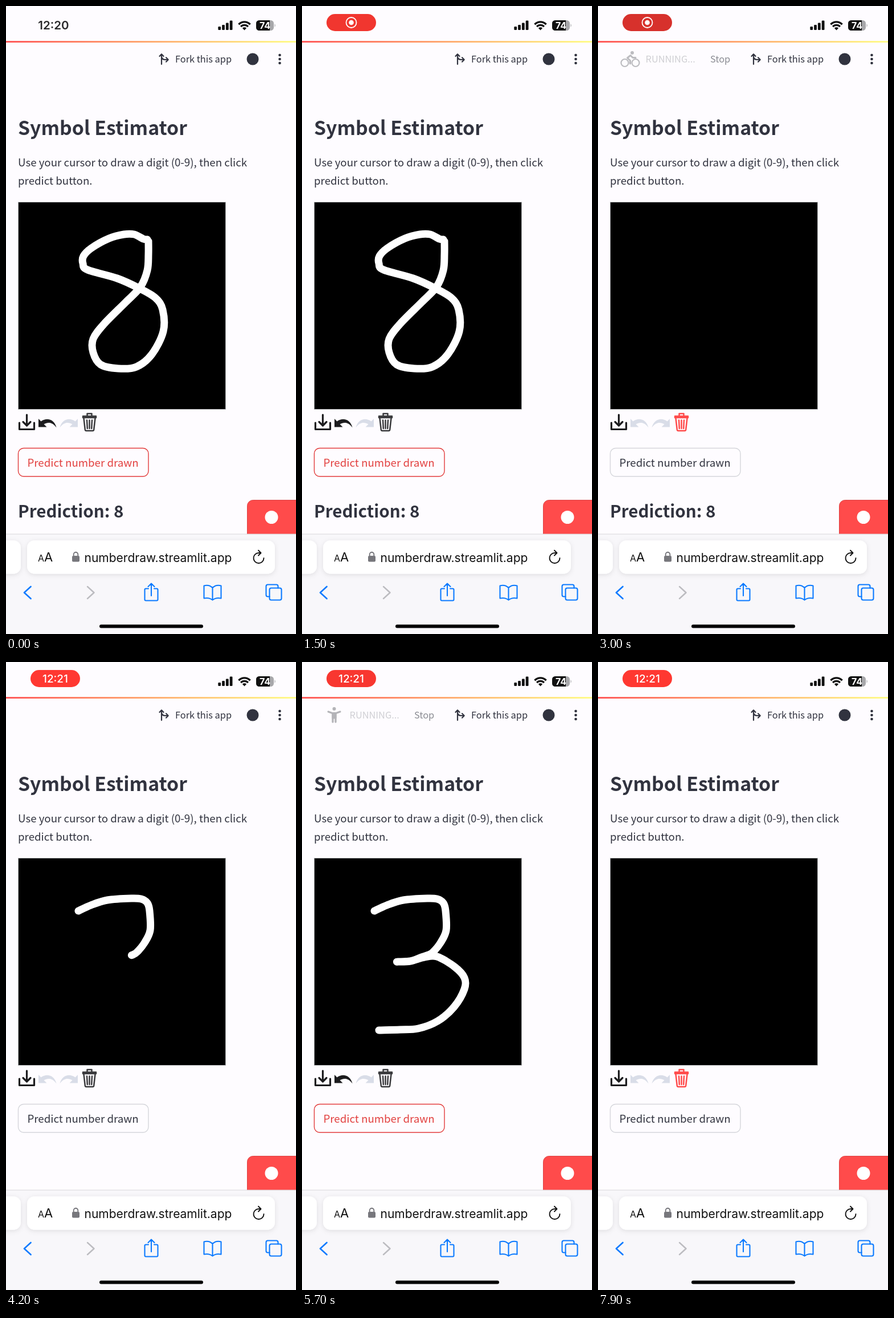
Write an HTML page that moves like this. It is 509 px wide and 1100 px high and loops after 8 s.

```html
<!DOCTYPE html>
<html lang="en">
<head>
<meta charset="utf-8">
<title>Digit drawing demo</title>
<style>
  html, body { margin: 0; width: 100%; height: 100%; overflow: hidden; background: #fefcff; }
  svg { display: block; width: 509px; height: 1100px; }
  text { fill: #31333f; font-family: "Noto Sans CJK JP", "Noto Sans CJK SC", "Noto Sans CJK", "Noto Sans", sans-serif; font-size: 18.7px; white-space: pre; }
  .small { font-size: 16.35px; }
  .bold { font-weight: 700; }
  .ios { font-family: Inter, Roboto, sans-serif; fill: #111; }
  .line { fill: none; stroke-linecap: round; stroke-linejoin: round; }
  .blue { stroke: #0a7aff; stroke-width: 2.1; }
  .ink { stroke: #fff; stroke-width: 13; }
</style>
</head>
<body>
<svg viewBox="0 0 509 1100">
  <defs>
    <linearGradient id="bar"><stop stop-color="#ff4b4b"/><stop offset="1" stop-color="#fffd80"/></linearGradient>
    <filter id="shade" x="-10%" y="-20%" width="120%" height="150%">
      <feDropShadow dx="0" dy="2" stdDeviation="4" flood-color="#000" flood-opacity=".1"/>
    </filter>
    <path id="turn" d="M57 723 V737.5 H71.5 L66.5 732.5 C74 728 82 729 88.5 738.5 C85 724 72 720 61.5 727.5 Z"/>
  </defs>
  <rect width="509" height="1100" fill="#fefcff"/>

  <!-- status bar -->
  <text id="clock" class="ios" x="83.5" y="41.3" text-anchor="middle" font-weight="600" style="font-size:20.5px;fill:#29292b">12:20</text>
  <g id="pill">
    <rect id="pillBox" x="43" y="14" width="87" height="30" rx="15"/>
    <g id="rec" fill="none" stroke="#fff" stroke-width="1.8">
      <circle cx="86.5" cy="29" r="9"/><circle cx="86.5" cy="29" r="4.3" fill="#fff" stroke="none"/>
    </g>
    <text id="pillTime" class="ios" x="86.5" y="36" text-anchor="middle" font-weight="500" style="font-size:19px;fill:#fff">12:21</text>
  </g>
  <g id="signal" fill="#111"></g>
  <g class="line" stroke="#111" stroke-width="3.4" style="stroke-linecap:butt">
    <path d="M408.4 32.2 A14 14 0 0 1 428.6 32.2"/>
    <path d="M412.1 36.2 A8.6 8.6 0 0 1 424.9 36.2"/>
    <path d="M418.5 42.5 l-3.6 -3.8 a5.2 5.2 0 0 1 7.2 0 z" fill="#111" stroke="none"/>
  </g>
  <rect x="439" y="25" width="31" height="18" rx="5.5" fill="#a8a8ab"/>
  <path d="M463 25 h-18.5 a5.5 5.5 0 0 0 -5.5 5.5 v7 a5.5 5.5 0 0 0 5.5 5.5 h18.5 z" fill="#111"/>
  <path d="M471.5 31 q2.5 3 0 6 z" fill="#a8a8ab"/>
  <text class="ios" x="454.5" y="40" text-anchor="middle" font-weight="700" style="font-size:16px;fill:#fff">74</text>

  <!-- app header -->
  <rect y="61.3" width="509" height="2.7" fill="url(#bar)"/>
  <g id="running">
    <g id="bike" class="line" stroke="#bcbcc0" stroke-width="2.2">
      <circle cx="47" cy="99.5" r="6.5"/><circle cx="66" cy="99.5" r="6.5"/>
      <circle cx="60" cy="82" r="3" fill="#bcbcc0" stroke="none"/>
      <path d="M56.5 101 V95.5 L51.5 91 L57 86.5 L61 90.5 H66" stroke-width="3"/>
    </g>
    <g id="man" class="line" stroke="#b4b4b8" stroke-width="3">
      <circle cx="56.5" cy="82" r="3" fill="#b4b4b8" stroke="none"/>
      <path d="M46 87 L53 89.5 H60 L67 87"/>
      <path d="M54 90 V105 M59 90 V105" stroke-width="3.3"/>
      <path d="M54 90 h5 v8 h-5 z" fill="#b4b4b8"/>
    </g>
    <text class="small" x="83.5" y="99.3" style="fill:#cfcfd3">RUNNING...</text>
    <text class="small" x="197" y="99.3" style="fill:#8b8c93">Stop</text>
  </g>
  <path class="line" stroke="#31333f" stroke-width="2.2" d="M273 102 V85 M269.5 88 l3.5 -3.7 l3.5 3.7 M273 89 q1 5 6 5 h5 M281 90.3 l3.7 3.7 l-3.7 3.7"/>
  <text class="small" x="297" y="99.3">Fork this app</text>
  <g fill="#31333f">
    <circle cx="433" cy="93" r="10.5"/>
    <circle cx="480.5" cy="86" r="2.3"/><circle cx="480.5" cy="93" r="2.3"/><circle cx="480.5" cy="100" r="2.3"/>
  </g>

  <!-- page -->
  <text class="bold" x="21" y="226" style="font-size:33.8px">Symbol Estimator</text>
  <text x="21" y="280.5">Use your cursor to draw a digit (0-9), then click</text>
  <text x="21" y="313">predict button.</text>
  <rect x="21.5" y="343.5" width="364" height="363" stroke="#b9b9bd"/>
  <path id="eight" class="line ink"/>
  <path id="three" class="line ink" pathLength="1"/>

  <path class="line" stroke="#1c1c1e" stroke-width="3.2" d="M23.5 730 V741.5 H49.5 V730 M36.5 716 V734 M30 728.5 l6.5 6.5 l6.5 -6.5"/>
  <use id="undo" href="#turn"/>
  <use href="#turn" transform="matrix(-1 0 0 1 183 0)" fill="#d9dde8"/>
  <path id="trash" class="line" stroke-width="2.5" d="M135 718.5 h23 v2.5 h-23 z M142.5 717.5 v-3.5 h8 v3.5 M136.5 722 l2.3 20 q.3 2 2 2 h11.4 q1.7 0 2 -2 l2.3 -20 M142 725.5 l.8 14.5 M146.5 725.5 v14.5 M151 725.5 l-.8 14.5"/>
  <rect id="btn" x="21.5" y="774.5" width="228.5" height="49.5" rx="9.5" fill="#fefcff" stroke-width="1.4"/>
  <text id="btnText" x="37.5" y="806.5">Predict number drawn</text>
  <text id="result" x="21" y="896.3" font-weight="600" style="font-size:29.6px"></text>
  <path d="M510 865.5 H433.5 a10 10 0 0 0 -10 10 V926 H510 z" fill="#ff4b4b" stroke="#dc4143"/>
  <circle cx="466" cy="895.5" r="11.5" fill="#fff"/>

  <!-- browser bar -->
  <rect y="925" width="509" height="175" fill="#f8f7fa"/>
  <rect y="924.5" width="509" height="1" fill="#d9d8dc"/>
  <g fill="#fff" filter="url(#shade)">
    <rect x="-30" y="936" width="56" height="58.5" rx="13"/>
    <rect x="37" y="936" width="435" height="58.5" rx="13"/>
  </g>
  <text class="ios" x="56" y="973" style="font-size:16px">A<tspan style="font-size:22px">A</tspan></text>
  <rect x="116" y="963" width="13" height="10.5" rx="2" fill="#77777c"/>
  <path class="line" d="M118.7 963 v-2.5 a3.8 3.8 0 0 1 7.6 0 v2.5" stroke="#77777c" stroke-width="1.9"/>
  <text class="ios" x="137.5" y="973.5" style="font-size:21px">numberdraw.streamlit.app</text>
  <path class="line" d="M452.5 967 a9 9 0 1 1 -9 -9 h3.5 M443 953.5 l4.5 4.5 l-4.5 4.5" stroke="#111" stroke-width="1.9"/>
  <g class="line blue">
    <path d="M43.5 1017 L32 1027.5 L43.5 1038" stroke-width="2.6"/>
    <path d="M143 1017 L154.5 1027.5 L143 1038" stroke="#bcbcc0" stroke-width="2.4"/>
    <path d="M250 1020.5 h-4.5 q-2 0 -2 2 v17 q0 2 2 2 h19 q2 0 2 -2 v-17 q0 -2 -2 -2 h-4.5 M255 1033 V1012 M249.5 1017 l5.5 -5.5 l5.5 5.5"/>
    <path d="M362.5 1019 q-6 -6 -15 -3.5 v22 q9 -2 15 3 q6 -5 15 -3 v-22 q-9 -2.5 -15 3.5 v21"/>
    <path d="M462.5 1034.5 h-3 q-3 0 -3 -3 v-15 q0 -3 3 -3 h15 q3 0 3 3 v3"/>
    <rect x="462.5" y="1019.5" width="21" height="21" rx="3"/>
  </g>
  <rect x="164" y="1083.4" width="182" height="6" rx="3" fill="#050505"/>
</svg>
<script>
const $ = id => document.getElementById(id);
const LOOP = 8000, STEP = 100;
const RED = '#ff4b4b', DARK = '#1c1c1e', PALE = '#d9dde8';

// Smooth stroke that passes through every point; a doubled point makes a corner.
function curve(list) {
  const p = list.split(' ').map(s => s.split(',').map(Number));
  const at = i => p[Math.max(0, Math.min(p.length - 1, i))];
  const lean = (i, from, to) => at(i).map((v, k) => (v + (at(to)[k] - at(from)[k]) / 6).toFixed(1));
  let d = 'M' + p[0];
  for (let i = 0; i < p.length - 1; i++) {
    d += `C${lean(i, i - 1, i + 1)} ${lean(i + 1, i + 2, i)} ${p[i + 1]}`;
  }
  return d;
}
$('eight').setAttribute('d', curve('248,409 241,408 225,400 207,400 181,407 150,424 136,438 135,451 143,462 195,477 233,494 262,511 275,532 276,570 256,610 229,632 197,635 166,628 153,607 153,583 172,557 210,519 236,492 248,463 250,435 250,412'));
$('three').setAttribute('d', curve('127,436 149,426 178,417 220,414 237,415 248,422 252,436 253,470 243,492 230,508 222,513 210,517 190,524 169,525 169,525 190,524 215,517 237,516 268,534 285,553 285,573 267,604 238,629 204,642 172,644 135,645'));

[6, 9, 12.5, 16.5].forEach((h, i) => {
  $('signal').innerHTML += `<rect x="${372.3 + i * 6.8}" y="${42 - h}" width="4.8" height="${h}" rx="1.3"/>`;
});

// [start, state changes]
const PEN_DOWN = 3700, PEN_TIME = 1340;
const steps = [
  [0, { digit: 8, undo: 1, hot: 1, result: 8 }],
  [700, { pill: 1 }],
  [2400, { digit: 0, undo: 0, hot: 0, bin: 1 }],
  [2800, { run: 'bike' }],
  [3400, { run: '', result: '' }],
  [3600, { time: 1 }],
  [PEN_DOWN, { digit: 3, bin: 0 }],
  [PEN_DOWN + PEN_TIME, { undo: 1 }],
  [5200, { hot: 1 }],
  [5500, { run: 'man' }],
  [6200, { run: '', result: 3 }],
  [7000, { bin: 1, hot: 0 }],
  [7200, { digit: 0, undo: 0 }],
  [7700, { result: '' }]
];

const show = (id, on) => { $(id).style.display = on ? '' : 'none'; };
const mix = (a, b, k) => Math.round(a + (b - a) * k);

function draw(t) {
  const s = {};
  for (const [at, change] of steps) if (t >= at) Object.assign(s, change);

  show('clock', !s.pill);
  show('pill', s.pill);
  show('rec', !s.time);
  show('pillTime', s.time);
  const glow = Math.min(1, .58 - .58 * Math.cos((t - 950) / 2050 * 2 * Math.PI));
  $('pillBox').setAttribute('fill', `rgb(${mix(215, 255, glow)},${mix(49, 56, glow)},${mix(44, 49, glow)})`);

  show('running', s.run);
  show('bike', s.run === 'bike');
  show('man', s.run === 'man');

  show('eight', s.digit === 8);
  show('three', s.digit === 3);
  const drawn = Math.min(1, Math.max(.004, (t - PEN_DOWN) / PEN_TIME));
  $('three').style.strokeDasharray = drawn < 1 ? drawn + ' 2' : 'none';

  $('undo').setAttribute('fill', s.undo ? DARK : PALE);
  $('trash').setAttribute('stroke', s.bin ? RED : '#3a3a3d');
  $('btn').setAttribute('stroke', s.hot ? '#e23c3c' : '#d5d6db');
  $('btnText').style.fill = s.hot ? '#e2403f' : '#31333f';
  $('result').textContent = s.result ? 'Prediction: ' + s.result : '';
}

const begin = performance.now();
function tick() {
  const t = (performance.now() - begin) % LOOP;
  draw(Math.floor(t / STEP) * STEP);
  requestAnimationFrame(tick);
}
tick();
</script>
</body>
</html>
```
